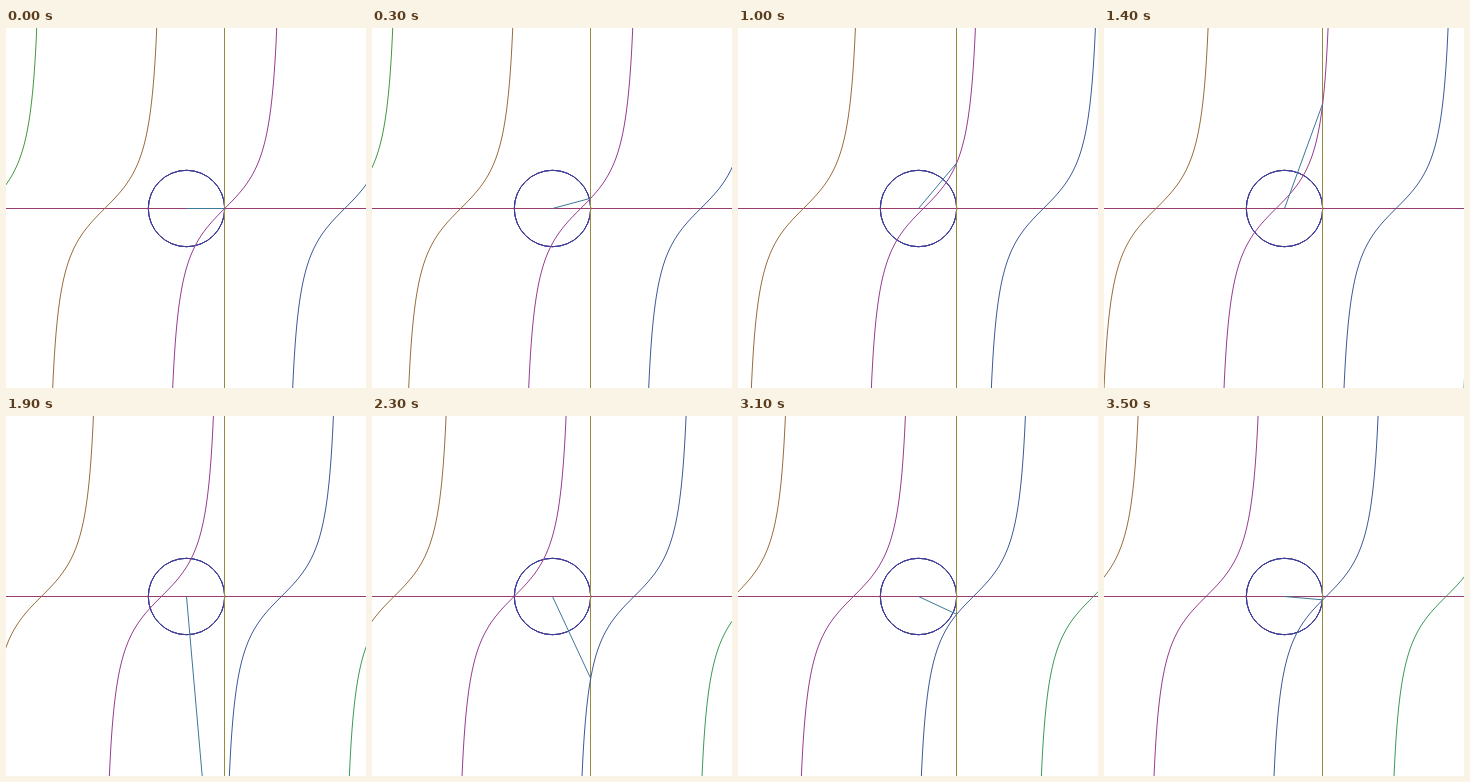
Animation of 360x360 px, one loop 3600 ms. Source, as an HTML page:

```html
<!DOCTYPE html>
<html lang="en">
<head>
<meta charset="utf-8">
<title>Tangent and the unit circle</title>
<style>
  html, body { margin: 0; width: 100%; height: 100%; overflow: hidden; background: #fff; }
  svg { display: block; width: 100vw; height: 100vh; }
</style>
</head>
<body>
<svg id="stage" viewBox="0 0 360 360" fill="none" stroke-width="1"></svg>
<script>
const LOOP = 3600, STEP = 100;
const CENTER = 180.5, RADIUS = 120 / Math.PI, PERIOD = 120;
const TANGENT_X = CENTER + RADIUS;
const stage = document.getElementById('stage');

// Successive plots advance the hue by a golden-ratio step.
function plotColor(index) {
  const hue = (0.67 + 0.236068 * index) % 1 * 360;
  return `hsl(${hue.toFixed(2)} 42.86% 42%)`;
}

function add(tag, attrs, parent = stage) {
  const node = document.createElementNS('http://www.w3.org/2000/svg', tag);
  for (const key in attrs) node.setAttribute(key, attrs[key]);
  parent.appendChild(node);
  return node;
}

// One tangent branch, sampled by height so it never meets its asymptote.
function branchPath(x) {
  const points = [];
  for (let y = -4; y <= 364; y += 2) {
    const px = x + RADIUS * Math.atan((CENTER - y) / RADIUS);
    points.push(`${px.toFixed(2)} ${y}`);
  }
  return 'M' + points.join('L');
}

// Repeated strokes give the circle its firmer edge.
for (let i = 0; i < 3; i++) {
  add('circle', { cx: CENTER, cy: CENTER, r: RADIUS, stroke: plotColor(0) });
}
add('path', { d: `M0 ${CENTER}H360`, stroke: plotColor(1) });
add('path', { d: 'M218.5 0V360', stroke: plotColor(2) });

const curves = add('g', {});
for (let i = 0; i < 5; i++) {
  add('path', { d: branchPath(TANGENT_X + (2 - i) * PERIOD), stroke: plotColor(3 + i) }, curves);
}
const ray = add('line', { x1: CENTER, y1: CENTER, stroke: plotColor(8) });

function render(time) {
  const progress = Math.floor(time % LOOP / STEP) * STEP / LOOP;
  const angle = progress * Math.PI;
  const slope = Math.tan(angle);
  // Shorten steep rays to just beyond the stage.
  const run = RADIUS * Math.min(1, 8 / Math.abs(slope || 1e-9));
  curves.setAttribute('transform', `translate(${-progress * PERIOD} 0)`);
  ray.setAttribute('x2', CENTER + run);
  ray.setAttribute('y2', CENTER - run * slope);
}

const start = performance.now();
function tick() {
  render(performance.now() - start);
  requestAnimationFrame(tick);
}
tick();
</script>
</body>
</html>
```
